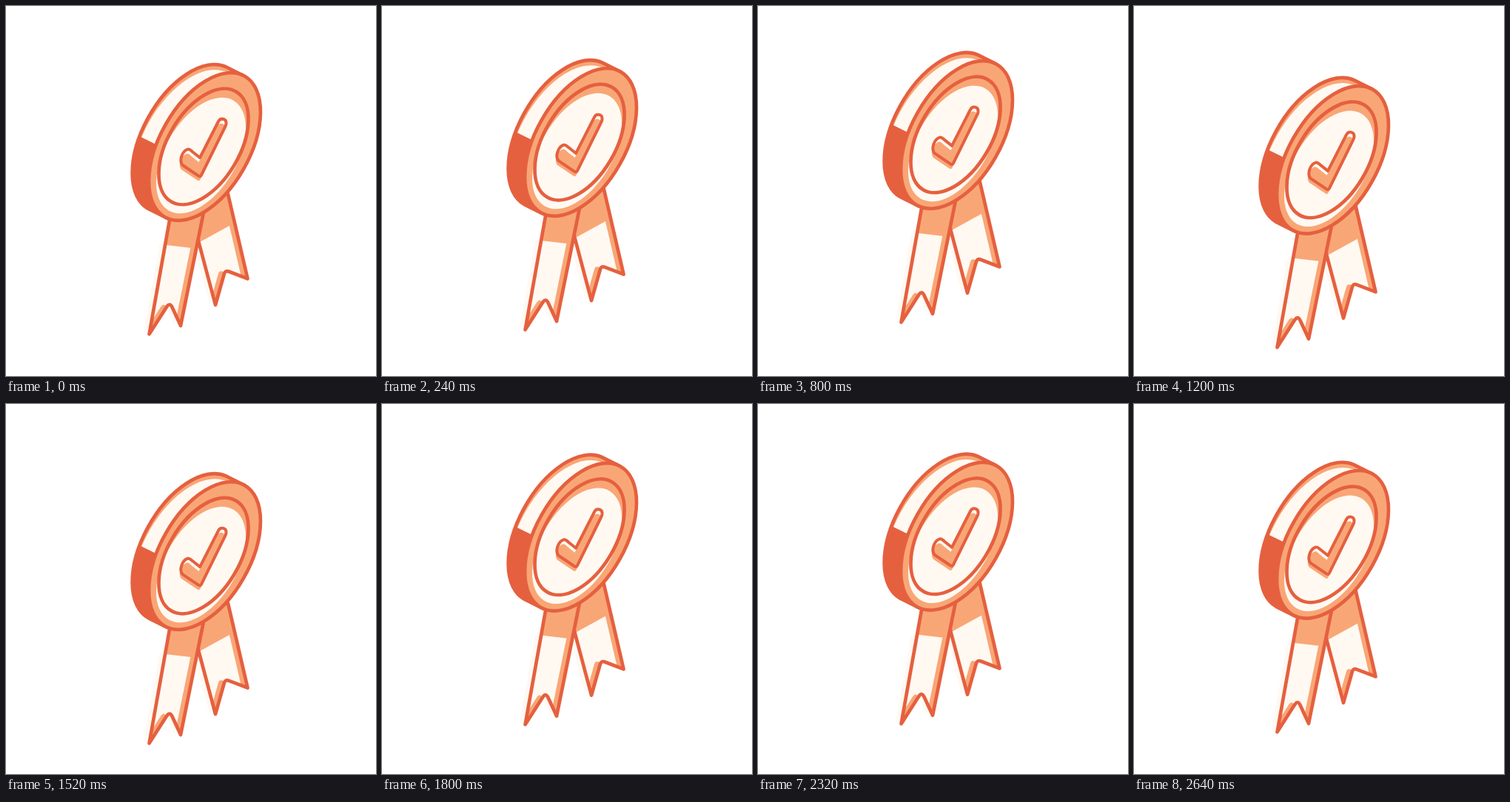
Animation, 500 px wide and 500 px high, one loop 2.68 s. Source, as an HTML page:

```html
<!DOCTYPE html>
<html lang="en">
<head>
<meta charset="utf-8">
<title>Award badge</title>
<style>
  html, body { margin: 0; height: 100%; overflow: hidden; background: #fff; }
  svg { display: block; width: 100%; height: 100%; }
  .line { fill: none; stroke: #e5603f; stroke-width: 4.7; stroke-linejoin: round; }
  .light { fill: #f9a676; }
  .cream { fill: #fff9f2; }
  .dark { fill: #e5603f; }
</style>
</head>
<body>
<svg viewBox="0 0 500 500">
  <defs>
    <path id="backTail" d="M262 250 L257.5 308 L283 404 L295 361.5 Q296.5 357 301 358.8 L326.5 368.5 L299 250Z"/>
    <path id="frontTail" d="M222 284 L193.5 443.5 L217.5 406 Q221.5 400.5 224.5 407 L236 432 L268 274Z"/>
    <path id="tick" d="M262 205 L287 156 C290 150.5 298 152 297.5 159 Q297.3 161 296 163.5 L264 228.5 Q262.5 231.5 260 229.5 L238.5 215 C233.5 209 238 196 245.5 193.7 C248 193 250 195 252 197Z"/>
    <path id="rim" d="M216.2 286 l-24 -12 A109.4 60.7 -60.5 0 1 296.8 82 l24 12 A109.4 60.7 -60.5 0 1 216.2 286Z"/>
    <ellipse id="face" rx="109.4" ry="60.7" transform="translate(268.5 190) rotate(-60.5)"/>
    <ellipse id="plate" rx="86.3" ry="48.4" transform="translate(267 190) rotate(-59.4)"/>
    <clipPath id="rimClip"><use href="#rim"/></clipPath>
    <clipPath id="backShade"><path d="M230 336.5 L340 276 V460 H230Z"/></clipPath>
    <clipPath id="frontShade"><path d="M170 317.6 L280 330.5 V460 H170Z"/></clipPath>
  </defs>
  <g id="badge">
    <use href="#backTail" class="light"/>
    <g clip-path="url(#backShade)"><use href="#backTail" class="cream" x="-8"/></g>
    <use href="#backTail" class="line"/>

    <use href="#frontTail" class="light"/>
    <g clip-path="url(#frontShade)"><use href="#frontTail" class="cream" x="-8"/></g>
    <use href="#frontTail" class="line"/>

    <use href="#rim" class="light"/>
    <g clip-path="url(#rimClip)">
      <use href="#face" class="cream" x="-22" y="-4"/>
      <path class="dark" d="M160 166 L220 195.5 V300 H160Z"/>
    </g>
    <use href="#rim" class="line"/>

    <use href="#face" class="light"/>
    <use href="#plate" class="cream" x="-3.5" y="12"/>
    <use href="#face" class="line"/>
    <use href="#plate" class="line"/>

    <use href="#tick" class="cream"/>
    <use href="#tick" class="light" x="-1.5" y="6"/>
    <use href="#tick" class="line" style="stroke-width:4"/>
  </g>
</svg>
<script>
  const LOOP = 2680, STEP = 40;
  const heights = [0, -20.3, 22.7, -20.3, 0];
  const badge = document.getElementById('badge');
  const smooth = p => p * p * (3 - 2 * p);

  function draw() {
    const time = Math.floor(performance.now() % LOOP / STEP) * STEP;
    const phase = time / LOOP * 4;
    const leg = Math.floor(phase);
    const y = heights[leg] + (heights[leg + 1] - heights[leg]) * smooth(phase - leg);
    badge.setAttribute('transform', `translate(0 ${y.toFixed(2)})`);
    requestAnimationFrame(draw);
  }
  draw();
</script>
</body>
</html>
```
